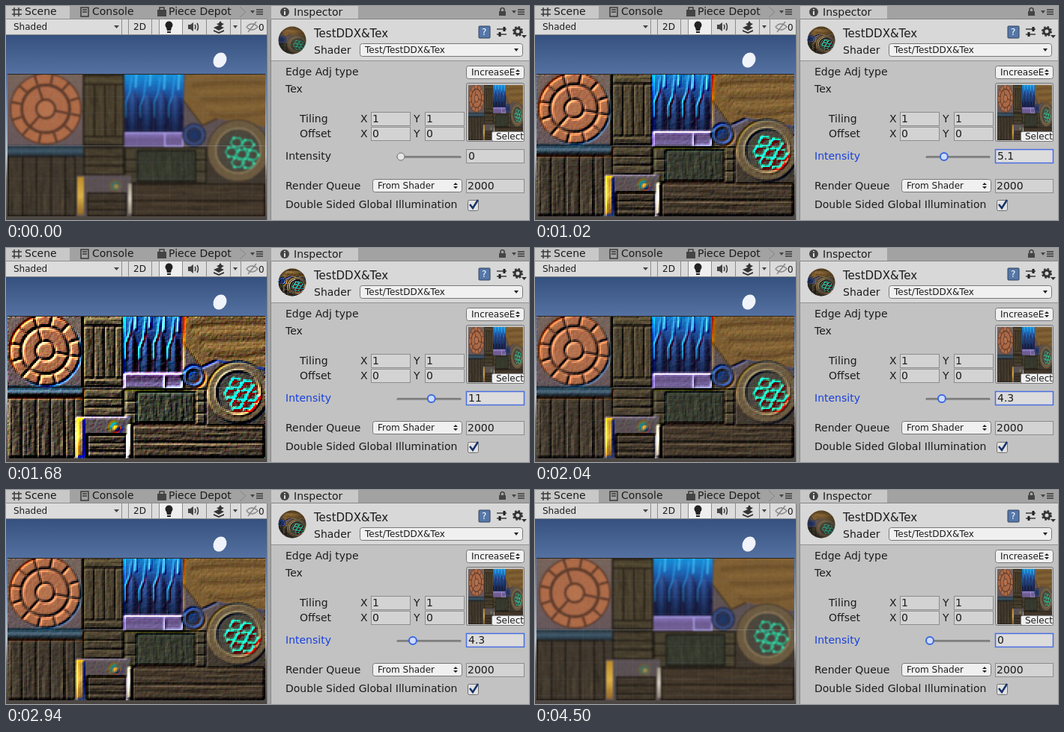
Animation, 698 px wide and 287 px high, one loop 4.56 s. Source, as an HTML page with a canvas:

```html
<!DOCTYPE html>
<html>
<head>
<meta charset="utf-8">
<style>
html, body { margin: 0; width: 100%; height: 100%; overflow: hidden; background: #a2a2a2; }
canvas, svg { position: absolute; left: 0; top: 0; width: 698px; height: 287px; }
text { font: 14px "DejaVu Sans", sans-serif; fill: #1c1c1c; white-space: pre; }
.title { font-size: 15px; }
.small { font-size: 12px; }
.ink { fill: none; stroke: #3a3a3a; stroke-width: 1.5; }
.field { fill: #d3d3d3; stroke: #8c8c8c; }
.button { fill: #f0f0f0; stroke: #777; }
.focus .label { fill: #1740dc; }
.focus .value { fill: #dcdcdc; stroke: #4a6ee0; stroke-width: 1.5; }
.focus .knob { fill: #cfdcff; stroke: #3c68e0; stroke-width: 2; }
</style>
</head>
<body>
<canvas id="view" width="698" height="287"></canvas>
<svg id="ui" viewBox="0 0 698 287">
  <!-- scene tabs -->
  <path d="M0 0H85V17H0Z" fill="#c8c8c8"/>
  <path d="M312 1L320 8L312 15" fill="none" stroke="#858585"/>
  <path class="ink" d="M11 2V14M17 2V14M8 5H21M8 11H21"/>
  <path class="ink" d="M100 2H110V14H100ZM102 5H108M102 8H108"/>
  <path d="M202 5H214V14H202Z" fill="#444"/><path class="ink" d="M205 6V2H211V6"/>
  <text x="25" y="12">Scene</text>
  <text x="115" y="12">Console</text>
  <text x="217" y="12">Piece Depot</text>
  <path d="M326 6H332L329 10Z" fill="#444"/><path class="ink" d="M334 5H343M334 8H343M334 11H343"/>
  <!-- scene toolbar -->
  <path d="M0 18H348V38H0Z" fill="#dcdcdc"/>
  <path d="M204 18H235V38H204Z" fill="#efefef"/>
  <path d="M0 17.5H348M0 38.5H348M154.500 18V38M163.500 18V38M194.500 18V38M204.500 18V38M235.500 18V38M267.500 18V38M299.500 18V38M313.500 18V38" stroke="#8c8c8c"/>
  <text class="small" x="10" y="32">Shaded</text>
  <path d="M144 26H151L147.500 30Z" fill="#444"/>
  <text class="small" x="170" y="32">2D</text>
  <path d="M214 29A5 5 0 1 1 221 29L220 33H215ZM215 34H220V36H215Z" fill="#222"/>
  <path d="M243 25H246L250 22V34L246 31H243Z" fill="#444"/><path class="ink" d="M252 25Q254 28 252 31M255 23Q258 28 255 33"/>
  <path d="M277 29L284 26L291 29L284 33ZM277 32L284 35L291 32V34L284 37L277 34Z" fill="#333"/>
  <path d="M286 20L288 23L291 24L288 26L286 29L284 26L281 24L284 23Z" fill="#333"/>
  <path d="M303 26H309L306 30Z" fill="#444"/>
  <path class="ink" d="M321 28Q328 20 336 28Q328 36 321 28M323 35L334 21" style="stroke:#888"/>
  <text class="small" x="337" y="33">0</text>
  <!-- inspector header -->
  <path d="M354 0H470V17H354Z" fill="#c8c8c8"/>
  <circle cx="372" cy="8" r="6" fill="#444"/><path d="M372 4V5.500M372 7V12" stroke="#ddd" stroke-width="2"/>
  <text x="384" y="13">Inspector</text>
  <path d="M658 7H667V13H658Z" fill="#444"/><path class="ink" d="M660 7V4Q662.500 1 665 4V7"/>
  <path d="M675 6H681L678 10Z" fill="#444"/><path class="ink" d="M683 5H692M683 8H692M683 11H692"/>
  <text class="title" x="411" y="42">TestDDX&amp;Tex</text>
  <text x="411" y="64">Shader</text>
  <rect x="631" y="27" width="15" height="16" rx="1" fill="#5577a8" stroke="#33435c"/>
  <text class="small" x="635" y="39" style="fill:#fff">?</text>
  <path class="ink" d="M655 31H668M655 38H668" stroke-width="2"/><path d="M665 28V34M659 35V41" stroke="#222" stroke-width="3"/>
  <circle cx="683" cy="34" r="4" fill="none" stroke="#333" stroke-width="3"/>
  <circle cx="683" cy="34" r="6" fill="none" stroke="#333" stroke-width="2" stroke-dasharray="2.5 2.2"/>
  <path d="M688 39H695L691.500 43Z" fill="#333"/>
  <g id="controls"></g>
  <!-- properties -->
  <text x="373" y="93">Edge Adj type</text>
  <text x="373" y="116">Tex</text>
  <rect x="614.500" y="103.500" width="77" height="78" rx="2" fill="none" stroke="#777"/>
  <rect x="648.500" y="168.500" width="43" height="13" rx="2" class="button"/>
  <text class="small" x="654" y="179">Select</text>
  <text x="392" y="156">Tiling</text><text x="392" y="176">Offset</text>
  <text x="373" y="246">Render Queue</text>
  <text x="373" y="271">Double Sided Global Illumination</text>
  <rect x="616.500" y="260.500" width="14" height="14" rx="2" fill="#e2e2e2" stroke="#707070"/>
  <path d="M619 266L623 271L630 260" fill="none" stroke="#16336b" stroke-width="2.500"/>
  <g id="intensity">
    <text class="label" x="373" y="206">Intensity</text>
    <path d="M523 202.500H606" stroke="#777" stroke-width="3" stroke-linecap="round"/>
    <path d="M523 203H606" stroke="#999"/>
    <circle class="knob" id="knob" cx="527" cy="202" r="5" fill="#e6e6e6" stroke="#707070"/>
    <rect class="field value" x="614.500" y="192.500" width="77" height="18"/>
    <text id="number" x="617" y="206">0</text>
  </g>
</svg>
<script>
const LOOP = 4560, STEP = 60;
const RUNS = [
  [780, [0.3, 1.1, 2.2, 3.6, 5.1, 6.6, 8, 9.2, 10]],
  [1320, [10.5, 11.1, 11.6, 11.9, 11.9, 11.5, 11, 10.5, 9.7]],
  [1860, [8.4, 7, 5.6, 4.3, 2.4, 1.1]],
  [2580, [1.5, 2.1, 2.7, 3.2, 3.7, 4.1, 4.3]],
  [3360, [3.8, 3, 2.2, 1.4, 0.5, 0.2, 0]]
];
const W = 344, H = 190, LEFT = 2, TOP = 92;
const $ = id => document.getElementById(id);

// Inspector widgets
const dropdown = (x, y, w, label, single) =>
  `<rect class="button" x="${x}.5" y="${y}.5" width="${w}" height="17" rx="3"/>
   <text class="small" x="${x + 7}" y="${y + 13}">${label}</text>
   <path fill="#222" transform="translate(${x + w - 8} ${y + 9})" d="${single
     ? 'M-3 -2H3L0 2Z' : 'M-3 -1L0 -4L3 -1ZM-3 1L0 4L3 1Z'}"/>`;
const field = (x, y, w, label) =>
  `<rect class="field" x="${x}.5" y="${y}.5" width="${w}" height="18"/><text x="${x + 2}" y="${y + 14}">${label}</text>`;
$('controls').innerHTML =
  dropdown(472, 50, 217, 'Test/TestDDX&amp;Tex', true) + dropdown(614, 80, 77, 'IncreaseE') +
  dropdown(489, 232, 119, 'From Shader') + field(614, 232, 77, '2000') +
  [[142, 1], [162, 0]].map(([y, v]) =>
    `<text x="473" y="${y + 14}">X</text><text x="544" y="${y + 14}">Y</text>` +
    field(487, y, 52, v) + field(559, y, 52, v)).join('');

let seed = 7;
const rand = () => (seed = (seed * 16807) % 2147483647) / 2147483647;

function surface(w, h) {
  const c = document.createElement('canvas');
  c.width = w; c.height = h;
  return c.getContext('2d', { willReadFrequently: true });
}

function paintTexture() {
  const g = surface(W, H);
  g.translate(-LEFT, -TOP);
  const box = (x, y, w, h, fill) => { g.fillStyle = fill; g.fillRect(x, y, w, h); };
  const line = (color, width, ...p) => {
    g.strokeStyle = color; g.lineWidth = width; g.beginPath();
    for (let i = 0; i < p.length; i += 2) g.lineTo(p[i], p[i + 1]);
    g.stroke();
  };
  const disc = (x, y, r, fill) => { g.fillStyle = fill; g.beginPath(); g.arc(x, y, r, 0, 7); g.fill(); };
  const ring = (x, y, r, color, width) => {
    g.strokeStyle = color; g.lineWidth = width; g.beginPath(); g.arc(x, y, r, 0, 7); g.stroke();
  };
  const shade = (x, y, w, h, ...colors) => {
    const f = g.createLinearGradient(0, y, 0, y + h);
    colors.forEach((c, i) => f.addColorStop(i / (colors.length - 1), c));
    box(x, y, w, h, f);
  };
  const wood = (x, y, w, h, fill, plank, across) => {
    box(x, y, w, h, fill);
    const span = across ? h : w, run = across ? w : h;
    const streak = (at, from, len, size, color) => across
      ? box(x + from, y + at, len, size, color) : box(x + at, y + from, size, len, color);
    for (let i = 0; i < span * 1.5; i++) {
      const from = rand() * run * 0.8;
      streak(rand() * (span - 1), from, Math.min(run - from, run * (0.1 + rand() * 0.4)), 1.5,
        rand() < 0.5 ? 'rgba(0,0,0,.12)' : 'rgba(190,165,120,.06)');
    }
    for (let i = plank; i < span - 3; i += plank) streak(i, 0, run, 2, 'rgba(10,8,6,.55)');
    g.strokeStyle = 'rgba(15,12,10,.6)'; g.lineWidth = 2;
    g.strokeRect(x + 1, y + 1, w - 2, h - 2);
  };

  box(LEFT, TOP, W, H, '#40382f');

  // Stone wheel
  shade(2, 91, 100, 97, '#77645a', '#66565a');
  disc(53, 138, 48, '#5d3a2a');
  ring(53, 138, 40, '#ae6b47', 12);
  ring(53, 138, 22, '#ac6a48', 16);
  disc(53, 138, 11, '#b5724d');
  for (let i = 0; i < 12; i++) {
    const a = i * Math.PI / 6 + 0.2, c = Math.cos(a), s = Math.sin(a);
    line('#5d3a2a', 3, 53 + 34 * c, 138 + 34 * s, 53 + 47 * c, 138 + 47 * s);
    if (i % 4 == 0) line('#5d3a2a', 3, 53 + 13 * c, 138 + 13 * s, 53 + 31 * c, 138 + 31 * s);
  }

  // Left timbers
  shade(2, 187, 101, 15, '#223039', '#41596a', '#1d282f');
  wood(2, 201, 91, 81, '#41382d', 19);
  wood(103, 91, 55, 97, '#4b412f', 14);
  wood(103, 92, 55, 14, '#50452f', 13, true);
  wood(103, 174, 55, 13, '#473e2d', 12, true);
  wood(103, 189, 55, 38, '#453c2c', 12, true);

  // Glowing pipes
  shade(158, 91, 79, 79, '#1493dc', '#1d64b4', '#1f2f70', '#272555', '#51458a');
  for (let i = 0; i < 4; i++) {
    const x = 160 + i * 19, y = 116 + (i % 2) * 5;
    const f = g.createLinearGradient(x, 0, x + 17, 0);
    ['#182553', '#315aa4', '#18204b'].forEach((c, k) => f.addColorStop(k / 2, c));
    g.fillStyle = f;
    g.beginPath(); g.moveTo(x, 168); g.lineTo(x, y + 13); g.quadraticCurveTo(x + 3, y, x + 8.5, y - 3);
    g.quadraticCurveTo(x + 15, y, x + 17, y + 13); g.lineTo(x + 17, 168); g.fill();
    line('#29a8ee', 1.5, x, 150, x, y + 13, x + 5, y, x + 8, 94);
    line('#43c4f8', 2, x + 14, 91, x + 13, 105 + rand() * 8);
  }
  shade(158, 125, 79, 45, 'rgba(10,10,30,0)', 'rgba(10,10,30,.65)');
  shade(158, 169, 79, 20, '#8d7cc5', '#6d5a91', '#746298');
  line('#aaa0e8', 2, 159, 170, 236, 170, 236, 188, 212, 188, 212, 171);

  // Cloth and side wall
  box(237, 91, 109, 100, '#5d5153');
  g.fillStyle = '#7c5d32';
  g.beginPath(); g.moveTo(240, 91); g.lineTo(346, 91); g.lineTo(346, 162);
  g.lineTo(282, 151); g.lineTo(262, 160); g.lineTo(237, 127); g.fill();
  for (let i = 0; i < 6; i++) {
    g.strokeStyle = i % 2 ? 'rgba(65,42,18,.18)' : 'rgba(175,130,70,.16)'; g.lineWidth = 6;
    g.beginPath(); g.moveTo(242 + i * 6, 98 + i * 9);
    g.quadraticCurveTo(285, 88 + i * 13, 346, 93 + i * 10); g.stroke();
  }
  line('#4a3823', 2, 237, 127, 262, 160, 282, 151);

  // Lower panels
  wood(158, 189, 110, 49, '#484130', 16, true);
  wood(174, 193, 80, 43, '#35392e', 90);
  wood(168, 238, 178, 44, '#43372a', 22, true);
  box(93, 227, 74, 55, '#5a5053');
  wood(108, 250, 53, 32, '#41372b', 11, true);
  shade(95, 229, 9, 51, '#b98a2a', '#dcb247', '#94692a');
  shade(163, 238, 5, 41, '#a29b87', '#d8d1bf', '#8c8370');
  box(91, 227, 3, 55, '#2b251f');
  disc(146, 241, 9, '#6a5a40'); disc(146, 241, 6, '#456a61'); disc(147, 242, 3, '#a28743');

  // Blue knob
  disc(251, 173, 16, '#2a2e45'); ring(251, 173, 12, '#374a7d', 4); disc(251, 173, 7, '#1f3564');

  // Gauge
  disc(310, 194, 42, '#45382b'); ring(310, 194, 36, '#6b5a40', 9);
  ring(310, 194, 30, '#867555', 3); disc(310, 194, 28, '#4a463c');
  for (const [x, y] of [[311, 183], [326, 186], [304, 196], [318, 199], [332, 200], [312, 210], [326, 211]]) {
    const p = [];
    for (let k = 0; k < 7; k++) p.push(x - 3 + 8 * Math.cos(k * Math.PI / 3), y + 7 * Math.sin(k * Math.PI / 3));
    line('#27bd92', 2, ...p);
    for (let k = 0; k < 12; k += 4) disc(p[k], p[k + 1], 2, '#38e5ad');
  }

  // Rough grain, then a soft focus over the whole sheet
  const image = g.getImageData(0, 0, W, H), d = image.data;
  for (let i = 0; i < d.length; i += 4) {
    const n = (rand() - 0.5) * 16;
    for (let k = 0; k < 3; k++) d[i + k] += n + (rand() - 0.5) * 8;
  }
  g.putImageData(image, 0, 0);
  const soft = surface(W, H);
  soft.drawImage(g.canvas, 0, 0);
  soft.filter = 'blur(1px)';
  soft.drawImage(g.canvas, 0, 0);
  return soft;
}

const base = paintTexture();
const source = base.getImageData(0, 0, W, H).data;
const sharp = surface(W, H), sharpImage = sharp.createImageData(W, H);

// Screen-space derivatives, shared by each 2x2 pixel quad.
const slope = new Int16Array(source.length);
for (let y = 0; y < H; y++) for (let x = 0; x < W; x++) for (let k = 0; k < 3; k++) {
  const at = (px, py) => source[(py * W + px) * 4 + k], qx = x & ~1, qy = y & ~1;
  slope[(y * W + x) * 4 + k] = at(qx + 1, y) - at(qx, y) + at(x, qy + 1) - at(x, qy);
}

const view = $('view').getContext('2d');
function drawView(intensity) {
  const out = sharpImage.data;
  for (let i = 0; i < out.length; i++) out[i] = source[i] + slope[i] * intensity;
  sharp.putImageData(sharpImage, 0, 0);

  const box = (x, y, w, h, fill) => { view.fillStyle = fill; view.fillRect(x, y, w, h); };
  box(0, 0, 698, 287, '#a2a2a2');
  const sky = view.createLinearGradient(0, 39, 0, 287);
  [[0, '#36517f'], [0.21, '#5471a1'], [0.65, '#b9c2ca'], [0.78, '#706b67'], [1, '#4b4641']]
    .forEach(([p, c]) => sky.addColorStop(p, c));
  box(0, 39, 348, 248, sky);
  view.fillStyle = '#f0f3fa';
  view.beginPath(); view.ellipse(285.5, 72.5, 8.5, 10.5, 0.5, 0, 7); view.fill();
  box(LEFT, TOP - 1, W, 1, '#2b2522');
  view.drawImage(sharp.canvas, LEFT, TOP);
  for (let x = 20; x < 346; x += 22) box(x, TOP, 1, H, 'rgba(130,160,200,.07)');
  for (let y = 99; y < 282; y += 22) box(LEFT, y, W, 1, 'rgba(130,160,200,.07)');
  box(LEFT, 187, W, 1, 'rgba(170,185,200,.25)');
  box(348, 18, 1, 269, '#7d7d7d');
  box(354, 18, 344, 55, '#d8d8d8');
  box(354, 73, 344, 214, '#c2c2c2');
  box(354, 17, 344, 1, '#858585');
  box(354, 73, 344, 1, '#929292');
  box(353, 18, 1, 269, '#858585');
  view.drawImage(base.canvas, 617, 106, 73, 74);

  view.save();
  view.beginPath(); view.arc(382, 46, 18.5, 0, 7); view.clip();
  view.drawImage(sharp.canvas, 232, 22, 110, 124, 363, 27, 38, 38);
  const ball = view.createRadialGradient(378, 40, 8, 382, 46, 19);
  ball.addColorStop(0, 'rgba(0,0,0,0)'); ball.addColorStop(1, 'rgba(0,0,0,.35)');
  box(363, 27, 38, 38, ball);
  view.restore();
}

function valueAt(t) {
  const run = RUNS.filter(r => r[0] <= t).pop();
  if (!run) return 0;
  return run[1][Math.min(run[1].length - 1, Math.floor((t - run[0]) / STEP))];
}

let shown = -1;
function frame() {
  const t = performance.now() % LOOP, value = valueAt(t);
  $('intensity').setAttribute('class', t >= 780 ? 'focus' : '');
  if (value !== shown) {
    shown = value;
    drawView(value);
    $('knob').setAttribute('cx', 527 + 3.7 * value);
    $('number').textContent = value;
  }
  requestAnimationFrame(frame);
}
frame();
</script>
</body>
</html>
```
